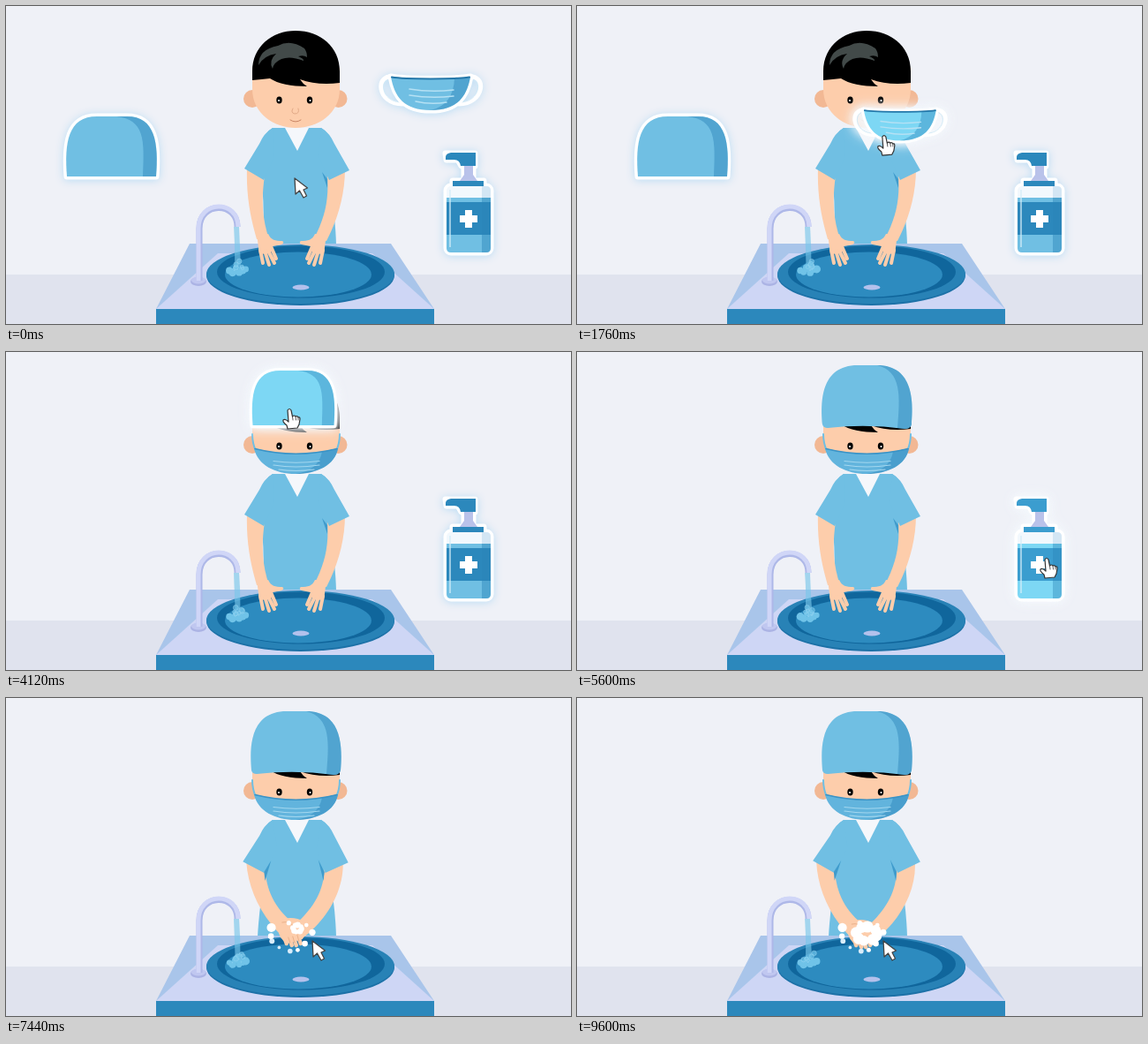
An HTML page for the animation above (9.64 s loop, 640 by 360 pixels).

```html
<!DOCTYPE html>
<html lang="en">
<head>
<meta charset="utf-8">
<title>Getting ready at the sink</title>
<style>
html, body { margin: 0; width: 100%; height: 100%; overflow: hidden; background: #eff1f7; }
svg { display: block; width: 100vw; height: 100vh; }
.skin { fill: #fdcdab; }
.cloth { fill: #70bfe3; }
.deep { fill: #2c88bc; }
.shade { fill: #2b84b8; opacity: .45; }
.edge { fill: #fff; stroke: #fff; stroke-width: 7; stroke-linejoin: round; }
.line { fill: none; stroke-linecap: round; stroke-linejoin: round; }
.item { filter: drop-shadow(0 1px 5px #b9dcf4); }
.item.hot { filter: drop-shadow(0 0 5px #f3f8fc) drop-shadow(0 0 7px #f3f6fb); }
.hot .cloth { fill: #7dd7f4; }
.hot .shade { opacity: .4; }
.hot .deep { fill: #3b9dcf; }
</style>
</head>
<body>
<svg viewBox="0 0 640 360">
  <defs>
    <g id="hand" class="skin">
      <path d="M-7 -6 H6 C9 1 14 2 22 2 Q25 4 21 6 L11 8 L9 16 L-4 17 Z"/>
      <path class="line" stroke="#fdcdab" stroke-width="4" d="M-3 12 L0 27 M2 13 L7 29 M6 13 L13 27 M9 8 L15 22"/>
    </g>
    <path id="maskShape" d="M436 80 C452 83 510 83 526 80 C522 103 511 118 481 118 C451 118 440 103 436 80 Z"/>
    <path id="capShape" d="M69 193 C66 155 70 125 103 125 H137 C169 125 173 155 170 193 Z"/>
  </defs>

  <rect width="640" height="360" fill="#eff1f7"/>
  <rect y="304" width="640" height="56" fill="#e0e3ee"/>

  <!-- torso -->
  <path class="cloth" d="M302 138 H357 Q366 143 369 154 L366 200 Q373 235 374 270 H291 Q293 235 290 200 L290 155 Q293 143 302 138 Z"/>
  <path id="hem" class="cloth" d="M293 205 Q287 235 285 270 H300 V205 Z"/>

  <!-- sink -->
  <path d="M208 269 H436 L485 343 H170 Z" fill="#a9c5ea"/>
  <path d="M170 343 L240 280 H415 L485 343 Z" fill="#ced6f5"/>
  <rect x="170" y="343" width="315" height="17" fill="#2c88bc"/>
  <ellipse cx="333.5" cy="305" rx="106.5" ry="34" fill="#1c71a7"/>
  <ellipse cx="333.5" cy="303.5" rx="106.5" ry="33.5" fill="#2882b6"/>
  <ellipse cx="334" cy="301" rx="95" ry="29.5" fill="#10669c"/>
  <ellipse cx="331" cy="304" rx="83" ry="25.5" fill="#2d8bbf"/>
  <ellipse cx="334" cy="318.5" rx="9.5" ry="3" fill="#b3c1ec"/>

  <!-- tap -->
  <ellipse cx="218" cy="312" rx="9" ry="5" fill="#abb3e4"/>
  <ellipse cx="218" cy="310.5" rx="8" ry="4" fill="#c0c7f0"/>
  <path id="stream" fill="#78c6ea" opacity=".65"/>
  <g class="line">
    <path d="M219 311 V252 C219 221 262 221 262 250" stroke="#aeb8e8" stroke-width="7" stroke-linecap="butt"/>
    <path d="M218 311 V252 C218 219 263 219 263 250" stroke="#d0d6f7" stroke-width="5" stroke-linecap="butt"/>
  </g>
  <g id="splash"></g>

  <!-- arms at rest -->
  <g id="rest">
    <path class="skin" d="M273 184 C272 215 277 240 284 264 L298 264 C290 240 289 220 293 192 Z"/>
    <path class="skin" d="M384 184 C384 215 375 243 363 266 L349 263 C361 240 366 220 364 192 Z"/>
    <use href="#hand" x="291" y="264"/>
    <use href="#hand" transform="translate(356 264) scale(-1 1)"/>
    <path class="cloth" d="M302 138 Q292 144 287 156 L270 184 L292 197 L304 170 Z"/>
    <path class="cloth" d="M357 138 Q367 144 372 156 L389 186 L366 197 L354 170 Z"/>
    <path d="M358 188 L364 196 L364 206 Z" fill="#3f9bcc"/>
  </g>

  <!-- arms washing -->
  <g id="wash">
    <g id="armR">
      <path class="skin" d="M382 186 C383 217 366 249 338 271 L329 256 C350 237 361 217 361 192 Z"/>
      <path class="cloth" d="M357 138 Q367 144 372 156 L388 186 L362 198 L352 170 Z"/>
      <path d="M354 183 L361 197 L360 207 Z" fill="#3f9bcc"/>
    </g>
    <g id="armL">
      <path class="skin" d="M272 186 C274 216 288 246 312 270 L325 255 C303 238 294 216 293 192 Z"/>
      <path class="cloth" d="M302 138 Q292 144 287 156 L268 185 L292 198 L307 170 Z"/>
      <path d="M300 184 L292 197 L293 207 Z" fill="#3f9bcc"/>
    </g>
    <g id="fists">
      <path class="skin" d="M310 252 Q324 247 337 254 Q343 263 335 274 L318 279 Q303 271 310 252 Z"/>
      <path class="line" stroke="#fdcdab" stroke-width="4.5" d="M313 267 L317 279 M318 267 L323 281 M323 266 L328 281 M328 265 L333 279"/>
      <path class="line" stroke="#eab18b" stroke-width="1" d="M319 272 L321 278 M324 271 L326 278 M329 269 L331 276 M312 255 Q321 253 325 260"/>
    </g>
    <g id="foam"></g>
  </g>

  <!-- head -->
  <path d="M316 138 H343 L330 164 Z" fill="#f5f7fb"/>
  <circle cx="279" cy="105" r="10" fill="#f2b894"/><circle cx="376.5" cy="105" r="10" fill="#f2b894"/>
  <path class="skin" d="M279 70 H378 V94 C378 122 353 138 328 138 C304 138 279 122 279 94 Z"/>
  <path d="M279 84 V74 C279 46 301 28 328 28 C356 28 378 46 378 74 V87 C362 89 346 88 333 83 Q336 88 341 91 C323 91 308 88 299 82 Q290 83 279 84 Z"/>
  <path fill="#424a49" d="M286 67 Q286 49 308 45 Q322 37 338 48 Q341 52 341 58 Q337 55 331 57 Q338 60 337 62 Q322 56 312 60 Q303 64 302 71 Q297 62 306 54 Q292 56 286 67 Z"/>
  <ellipse cx="309.5" cy="106.5" rx="3.2" ry="4"/><ellipse cx="344" cy="106.5" rx="3.2" ry="4"/>
  <circle cx="309" cy="107" r="1.1" fill="#fff"/><circle cx="344.5" cy="107" r="1.1" fill="#fff"/>
  <path class="line" stroke="#e2aa88" stroke-width="1" d="M325 116 Q322 121 327 122 Q333 122 331 116"/>
  <path class="line" stroke="#c98665" stroke-width="1" d="M322 129 Q328 133 334 129"/>

  <g id="maskOn">
    <path class="line" stroke="#70bfe3" stroke-width="2" d="M279 93 Q279 103 283 112 M378 93 Q378 103 374 112"/>
    <path fill="#62b4dd" d="M281 109 Q328 121 376 109 C373 128 352 138 328 138 C305 138 285 128 281 109 Z"/>
    <path class="shade" d="M358 113 L376 109 C373 128 352 138 328 138 Q354 134 358 113 Z"/>
    <path class="line" stroke="#3a93c6" stroke-width="1.4" d="M282 109.5 Q328 121 375 109.5"/>
    <path class="line" stroke="#a3d7ef" stroke-width="1.2" d="M303 123.5 Q328 127 355 123.5 M303 128 Q328 132 355 128 M309 133 Q328 136 349 133"/>
  </g>
  <g id="capOn">
    <path class="cloth" d="M278 82 C276 58 275 15 318 15 H340 C382 15 381 58 379 82 Q378 87 371 87 Q328 81 284 86 Q279 86 278 82 Z"/>
    <path class="shade" d="M340 15 C382 15 381 58 379 82 Q378 87 371 87 L363 86 C366 50 368 22 340 15 Z"/>
  </g>

  <!-- things to drag -->
  <g id="mask" class="item">
    <path class="line" stroke="#fff" stroke-width="5" d="M440 80 C417 76 420 111 449 111 M522 80 C546 76 542 111 513 111"/>
    <path class="line" stroke="#cfe8f6" stroke-width="1" d="M440 82 C421 80 424 109 448 109 M522 82 C541 80 538 109 514 109"/>
    <use href="#maskShape" class="edge"/>
    <use href="#maskShape" class="cloth"/>
    <path class="shade" d="M508 81.5 Q518 81 526 80 C522 103 511 118 481 118 Q507 112 508 81.5 Z"/>
    <path class="line" stroke="#2478aa" stroke-width="2" d="M437 80.5 C452 83 510 83 525 80.5"/>
    <path class="line" stroke="#b5e1f4" stroke-width="1.5" d="M457 94 Q481 98 507 95 M457 101 Q481 105 507 102 M464 108 Q481 112 499 109"/>
  </g>
  <g id="cap" class="item">
    <use href="#capShape" class="edge"/>
    <use href="#capShape" class="cloth"/>
    <path class="shade" d="M125 125 H137 C169 125 173 155 170 193 H155 C157 150 157 129 125 125 Z"/>
  </g>
  <g id="bottle" class="item">
    <g class="edge">
      <path d="M498 167 H531 V181 H516 L512 174 H499 Z"/><rect x="519" y="180" width="10" height="22"/>
      <rect x="506" y="198" width="35" height="8"/><rect x="499" y="204" width="50" height="75" rx="5"/>
    </g>
    <path class="deep" d="M498 171 Q498 167 504 166 H532 V181 H515 Q514 173 506 174 H498 Z"/>
    <path d="M519 181 H529 V191 L534 198 H514 L519 191 Z" fill="#b9c2ea"/>
    <rect class="deep" x="506" y="198" width="35" height="6"/>
    <rect x="499" y="204" width="50" height="75" rx="5" fill="#f2f8fd"/>
    <path d="M539 204 H544 Q549 204 549 209 V217 H539 Z" fill="#d3e6f4"/>
    <path class="cloth" d="M499 217 H549 V274 Q549 279 544 279 H504 Q499 279 499 274 Z"/>
    <rect class="deep" x="499" y="222" width="50" height="37"/>
    <path class="shade" d="M539 217 H549 V274 Q549 279 544 279 H539 Z"/>
    <path d="M503 208 V273" stroke="#d5eef9" stroke-width="2" opacity=".65"/>
    <path d="M520 231 H528 V237 H534 V245 H528 V251 H520 V245 H514 V237 H520 Z" fill="#fff"/>
  </g>

  <g id="arrow"><path d="M0 0 L1 18 L5.5 14 L10 22 L13.5 20 L10 13 L14.5 11 Z" fill="#fff" stroke="#444" stroke-width="1.3" stroke-linejoin="round"/></g>
  <g id="finger">
    <path fill="#fff" stroke="#333" stroke-width="1.2" stroke-linejoin="round" d="M-2 1 Q0 -2 2 1 L3.5 8 Q5.500 6 7 8 Q9 7 10 9 Q12 8 12 11 L11 17 L9 21 L-2 22 L-3 18 Q-8 14 -7 12 Q-5 10 -1 14 Z"/>
    <path class="line" stroke="#333" stroke-width=".8" d="M3.500 8 L4 12 M7 8 L7.500 12 M10 9 V12"/>
  </g>
</svg>
<script>
const LOOP = 9640, TAU = Math.PI * 2;
const $ = id => document.getElementById(id);
const show = (id, on) => { $(id).style.display = on ? '' : 'none'; };
const rnd = n => { const v = Math.sin(n * 127.1 + 3.7) * 43758.5453; return v - Math.floor(v); };
const unit = v => Math.min(1, Math.max(0, v));

// pointer stops: time, x, y
const path = [
  [0, 327, 195], [80, 327, 195], [960, 463, 111], [1160, 463, 111], [1760, 348, 147],
  [2040, 312, 139], [2150, 312, 139], [2960, 115, 172], [3270, 115, 172], [3360, 117, 171],
  [4120, 321, 65], [4400, 321, 65], [5000, 405, 130], [5480, 532, 234], [5680, 532, 234],
  [6020, 462, 249], [6850, 347, 275], [9640, 347, 275]
];

function slope(i, k) {
  const a = path[i - 1], b = path[i], c = path[i + 1];
  if (!a || !c || a[k] === b[k] || b[k] === c[k]) return 0;
  return (c[k] - a[k]) / (c[0] - a[0]);
}

function pointer(t) {
  let i = 0;
  while (i < path.length - 2 && path[i + 1][0] <= t) i++;
  const a = path[i], b = path[i + 1], d = b[0] - a[0], u = (t - a[0]) / d;
  const h = u * u * (3 - 2 * u);
  return [1, 2].map(k => a[k] + (b[k] - a[k]) * h +
    d * (slope(i, k) * u * (1 - u) * (1 - u) - slope(i + 1, k) * u * u * (1 - u)));
}

const items = [
  { id: 'mask', x: 481, y: 99, hover: 960, pick: 1120, drop: 2080 },
  { id: 'cap', x: 119.5, y: 159, hover: 2960, pick: 3260, drop: 4330 },
  { id: 'bottle', x: 524, y: 223, hover: 5440, pick: 5680, drop: 7050 }
];

function dots(id, n, fill) {
  const list = [];
  for (let i = 0; i < n; i++) {
    const c = document.createElementNS('http://www.w3.org/2000/svg', 'circle');
    c.setAttribute('fill', fill(i));
    list.push($(id).appendChild(c));
  }
  return list;
}
function place(c, x, y, r) {
  c.setAttribute('cx', x); c.setAttribute('cy', y); c.setAttribute('r', Math.max(0, r));
}
const drops = dots('splash', 14, () => '#70c3e8');
const suds = dots('foam', 20, i => i % 5 === 4 && i > 8 ? '#d9edfa' : '#fff');
drops.forEach((c, i) => {
  if (i > 5) { c.setAttribute('stroke', '#a5dcf4'); c.setAttribute('stroke-width', .4); c.setAttribute('fill-opacity', .65); }
});

function water(t) {
  const w = Math.sin(t / 90) * .8;
  $('stream').setAttribute('d', `M258 250 H264 Q${265 + w} 272 ${266 - w} 297 H${259 + w} Q${259.5 - w} 270 258 250 Z`);
  drops.forEach((c, i) => {
    if (i < 6) {
      place(c, 253 + i * 3.7, 299.5 + 3 * Math.sin(i * 2.4), 3.9 + .8 * Math.sin(t / 110 + i * 2));
    } else {
      const v = t / 640 + rnd(i), n = Math.floor(v), p = v - n;
      const dx = (rnd(i + n * 17 % 53) - .5) * 20;
      place(c, 262.5 + dx * (.4 + p * .6), 300 - Math.sin(p * Math.PI) * (4 + 9 * rnd(i * 3)), 3 * Math.sin(p * Math.PI));
    }
  });
}

function scrub(t) {
  const s = -Math.cos(TAU * (t - 7440) / 864);
  $('armL').setAttribute('transform', `rotate(${s * .8 + .4} 300 145)`);
  $('armR').setAttribute('transform', `rotate(${-s * .8 - .4} 360 145)`);
  $('fists').setAttribute('transform', `translate(${-s * .8} ${s})`);
  const grow = unit((t - 7050) / 350);
  suds.forEach((c, i) => {
    const a = i * 2.4;
    if (i < 9) {
      const wide = 8.5 + 3.5 * s;
      place(c, 329 + wide * Math.cos(a) - s, 264 + (6 + 2 * s) * Math.sin(a) + 3 * s, grow * (4.2 + 1.6 * s + rnd(i)));
    } else {
      const k = .75 + .25 * rnd(i), pulse = .75 + .25 * Math.sin(t / 170 + i * 1.7);
      place(c, 323 + 26 * k * Math.cos(a), 269 + 18 * k * Math.sin(a), grow * pulse * (2.2 + 3.3 * rnd(i + 40)));
    }
  });
}

function draw(t) {
  const [x, y] = pointer(t);
  let hand = false;
  for (const o of items) {
    const hot = t >= o.hover && t < o.drop;
    hand = hand || hot;
    show(o.id, t < o.drop);
    $(o.id).classList.toggle('hot', hot);
    let dx = 0, dy = 0;
    if (t >= o.pick) {
      const p = pointer(o.pick);
      dx = x - p[0]; dy = y - p[1];
    }
    const k = 1 - .09 * unit((t - o.pick) / 80);
    $(o.id).setAttribute('transform', `translate(${o.x + dx} ${o.y + dy}) scale(${k}) translate(${-o.x} ${-o.y})`);
  }
  show('maskOn', t >= items[0].drop);
  show('capOn', t >= items[1].drop);
  const washing = t >= items[2].drop;
  show('rest', !washing);
  show('wash', washing);
  show('hem', washing);
  show('finger', hand);
  show('arrow', !hand);
  $(hand ? 'finger' : 'arrow').setAttribute('transform', `translate(${x} ${y})`);
  water(t);
  if (washing) scrub(t);
}

const start = performance.now();
function tick() {
  draw((performance.now() - start) % LOOP);
  requestAnimationFrame(tick);
}
tick();
</script>
</body>
</html>
```
